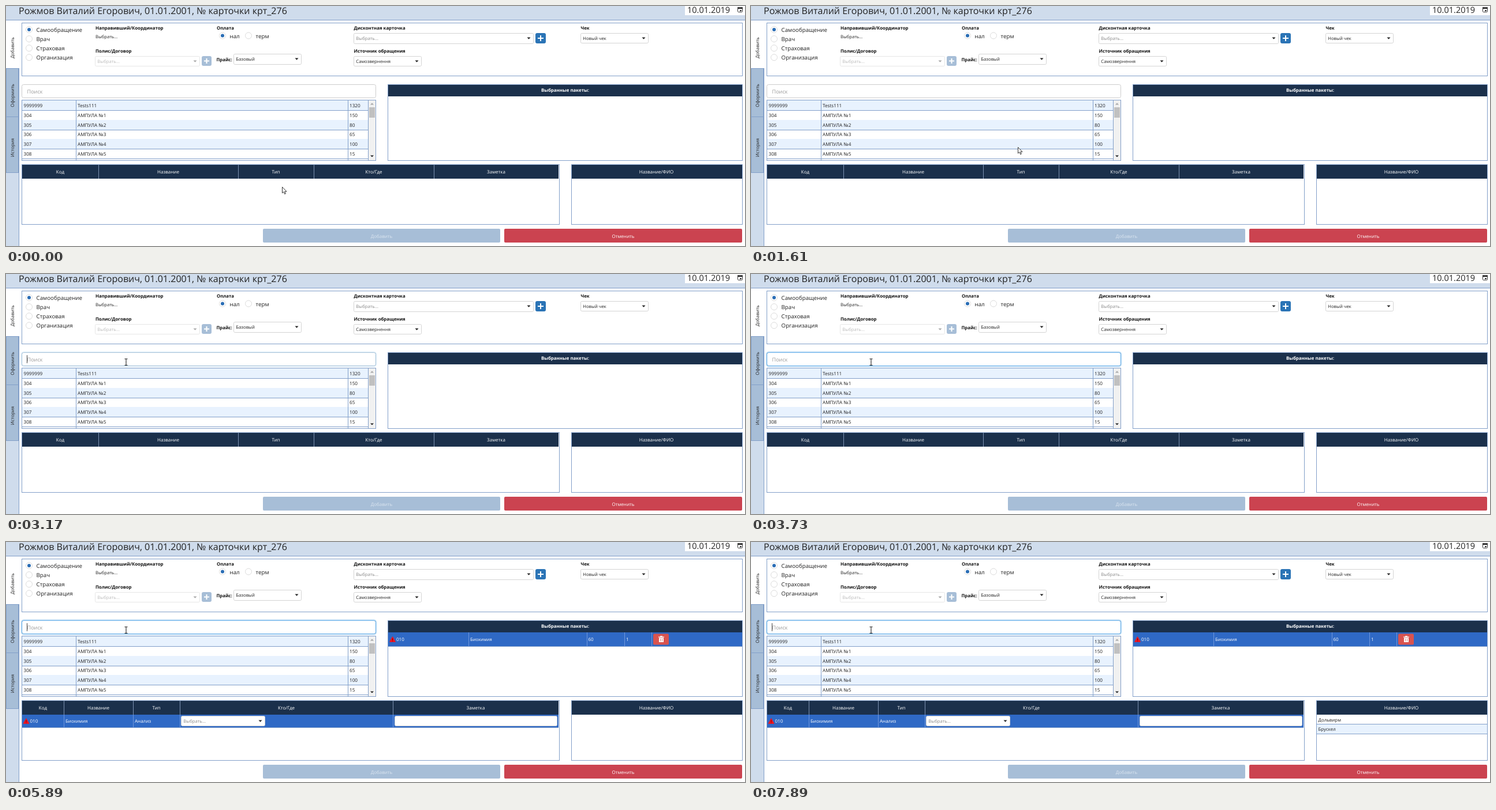
Write an HTML page that moves like this. It is 1280 px wide and 417 px high and loops after 8000 ms.

```html
<!DOCTYPE html>
<html lang="ru">
<head>
<meta charset="utf-8">
<style>
  html, body { margin: 0; width: 100%; height: 100%; overflow: hidden; }
  svg { display: block; width: 1280px; height: 417px; background: #fff; }
  text { font-family: "Open Sans", "Noto Sans", sans-serif; text-rendering: geometricPrecision; white-space: pre; }
</style>
</head>
<body>
<svg id="stage" viewBox="0 0 1280 417"></svg>
<script>
const LOOP = 8000;
const LINE = '#829fc9', NAVY = '#1b304b', PALE = '#e8f2fe', ROW = '#2f69c5', MUTED = '#a7bed7', INK = '#222';

// Shapes; box() edges are whole pixels, strokes sit inside.
const box = (x, y, x2, y2, fill, stroke, rx = 0) => {
  const o = stroke ? .5 : 0;
  return `<rect x="${x + o}" y="${y + o}" width="${x2 - x - 2 * o}" height="${y2 - y - 2 * o}" rx="${rx}" fill="${fill}" stroke="${stroke || 'none'}"/>`;
};
const path = (d, fill, stroke = 'none', width = 1) =>
  `<path d="${d}" fill="${fill}" stroke="${stroke}" stroke-width="${width}"/>`;
const vline = (x, y, y2, color = LINE) => box(x, y, x + 1, y2, color);
const hline = (x, x2, y, color = LINE) => box(x, y, x2, y + 1, color);
const text = (x, y, s, size = 7.9, fill = INK, extra = '') =>
  `<text x="${x}" y="${y}" font-size="${size}" fill="${fill}" ${extra}>${s}</text>`;
const mid = (x, y, s, fill = '#fff', extra = '') =>
  text(x, y, s, 8, fill, `text-anchor="middle" ${extra}`);
const bold = (x, y, s) => text(x, y, s, 7.8, '#111', 'font-weight="700"');

const caretDown = (x, y, color = INK) => path(`M${x - 3} ${y - 1.5}h6l-3 3.2z`, color);
const select = (x, y, x2, y2, s, ink = INK, border = '#d4d4d4') =>
  box(x, y, x2, y2, '#fff', border, 2) + text(x + 4.3, y + 11.6, s, 7.7, ink) +
  caretDown(x2 - 8.5, y + 9, ink === '#bbb' ? '#aaa' : INK);
const plus = (x, y, size, color) =>
  box(x, y, x + size, y + size, color, null, 3) +
  path(`M${x + size / 2} ${y + 4}v${size - 8}M${x + 4} ${y + size / 2}h${size - 8}`, 'none', '#fff', 2);
const radio = (x, y, label, on) =>
  `<circle cx="${x}" cy="${y}" r="5.5" fill="#fff" stroke="#dcdcdc"/>` +
  (on ? `<circle cx="${x}" cy="${y}" r="3" fill="#2a6db5"/>` : '') +
  text(x + 12.6, y + 4, label, 9.7);
const warning = (x, y) =>
  path(`M${x} ${y - 4.5}l5 9h-10z`, '#f01420', '#f01420', .8) +
  path(`M${x} ${y - 1.5}v3.2m0 1v1`, 'none', '#600', 1);
const sideTab = (y, y2, label, active) =>
  box(0, y, active ? 23 : 22, y2, active ? '#fff' : MUTED, active ? null : LINE) +
  text(0, 0, label, 7.9, INK, `text-anchor="middle" transform="translate(14 ${(y + y2) / 2 + (active ? 6 : 5)}) rotate(-90)"`);

function page() {
  const list = [['9999999', 'Tests111', 1320], ['304', 'АМПУЛА №1', 150], ['305', 'АМПУЛА №2', 80],
    ['306', 'АМПУЛА №3', 65], ['307', 'АМПУЛА №4', 100], ['308', 'АМПУЛА №5', 15]];
  const rows = list.map(([code, name, price], i) => {
    const y = Math.round(164 + i * 16.8), base = y + 11.5;
    return (i % 2 ? '' : box(28, y, 628, y + 17, PALE)) + hline(28, 628, y + 17) +
      text(30.5, base, code, 8.2) + text(124, base, name, 8.2) + text(595, base, price, 8.2);
  }).join('');

  return box(0, 0, 1280, 24, '#cfdcec') + box(0, 24, 22, 417, '#cfdcec') +
    hline(0, 1280, 24) + vline(22, 108, 417) +
    text(22, 13.5, 'Рожмов Виталий Егорович, 01.01.2001, № карточки крт_276', 16.05) +
    box(1176, 0, 1280, 16, '#fff') + text(1180, 12, '10.01.2019', 14.5) +
    box(1267, 2, 1276, 11, '#fff', '#333', 1) + box(1267, 2, 1276, 5, '#333') + box(1271, 7, 1274, 9, '#333') +
    sideTab(25, 108, 'Добавить', true) + sideTab(108, 193, 'Оформить') + sideTab(192, 290, 'История') +

    box(27, 29, 1276, 122, '#fff', LINE) +
    ['Самообращение', 'Врач', 'Страховая', 'Организация'].map((s, i) => radio(40, 41 + i * 16.1, s, !i)).join('') +
    bold(155, 40.5, 'Направивший/Координатор') + text(155, 56, 'Выбрать...', 7.6) +
    bold(155, 80.5, 'Полис/Договор') +
    select(154, 87, 336, 105, 'Выбрать...', '#bbb', '#e6e6e6') + plus(339, 87, 17, MUTED) +
    bold(365, 40.5, 'Оплата') + radio(375, 51.5, 'нал', true) + radio(420, 51.5, 'терм') +
    select(394, 83, 512, 102, 'Базовый') + bold(364.5, 95.5, 'Прайс:') +
    bold(602.5, 40.5, 'Дисконтная карточка') + select(602, 47, 914, 66, 'Выбрать...', '#888') + plus(917, 47, 18, '#2b74b6') +
    bold(602.5, 80.5, 'Источник обращения') + select(602, 87, 720, 105, 'Самозвернення') +
    bold(995.5, 40.5, 'Чек') + select(995, 47, 1113, 65, 'Новый чек') +

    box(27, 163, 641, 269, '#fff', LINE) + rows +
    [121, 592, 627].map(x => vline(x, 164, 268)).join('') +
    box(628, 164, 640, 268, '#f1f1f1') + box(629, 176, 639, 194, '#c1c1c1') +
    path('M631 171.5h6l-3-3z', '#a3a3a3') + path('M631 259.5h6l-3 3z', '#222') + hline(27, 641, 268) +

    box(661, 136, 1276, 269, '#fff', LINE) + box(662, 137, 1275, 157, NAVY) +
    text(968.5, 148.5, 'Выбранные пакеты:', 7.9, '#fff', 'text-anchor="middle" font-weight="700"') +
    box(27, 275, 959, 380, '#fff', LINE) + box(28, 276, 957, 300, NAVY) +
    box(979, 275, 1276, 380, '#fff', LINE) + box(980, 276, 1275, 300, NAVY) + mid(1126.5, 291, 'Название/ФИО') +
    box(445, 387, 856, 411, MUTED, null, 2) + mid(650.5, 402.5, 'Добавить', '#dbe5f0') +
    box(863, 387, 1275, 411, '#cb4350', null, 2) + mid(1069, 402.5, 'Отменить');
}

function tableHeader(edges) {
  return ['Код', 'Название', 'Тип', 'Кто/Где', 'Заметка'].map((s, i) =>
    mid((edges[i] + edges[i + 1]) / 2, 291, s) + (i ? vline(edges[i], 276, 300, '#7d92b2') : '')).join('');
}

// Selected row: fill, bottom rule and column rules.
const selectedRow = (x, x2, y, y2, columns) =>
  box(x, y, x2, y2, ROW) + hline(x, x2, y2 - 1) + columns.map(c => vline(c, y, y2, '#6f97dc')).join('');

function chosenPackage() {
  const edges = [28, 100, 220, 301, 670, 957];
  return selectedRow(662, 1275, 157, 182, [801, 1006, 1071, 1118]) +
    warning(669.5, 169) + text(676, 172, '010', 8, '#fff') + text(804, 172, 'Биохимия', 7.7, '#fff') +
    text(1008.5, 172, '60', 8, '#fff') + text(1074, 172, '1', 8, '#fff') +
    box(1121, 159.5, 1148, 178.5, '#d9534f', null, 2) +
    path('M1131 166.5h8v7.5h-8zM1130 164.5h10v1.2h-10zM1133 163.3h4v1.2h-4z', '#fff') +
    path('M1133.5 168v4.5m3-4.5v4.5', 'none', '#d9534f', .8) +
    tableHeader(edges) + selectedRow(28, 957, 300, 323, edges.slice(1, 5)) +
    warning(35, 311) + text(41.5, 314, '010', 8, '#fff') + text(103, 314, 'Биохимия', 7.8, '#fff') +
    text(223, 314, 'Анализ', 8, '#fff') +
    select(303, 302, 449, 320, 'Выбрать...', '#888') + box(673, 302, 955, 320, '#fff', '#d4d4d4', 2);
}

const performers = () =>
  text(982.5, 311.5, 'Дольвирм') + hline(980, 1275, 316) +
  box(980, 317, 1275, 333, PALE) + text(982.5, 328, 'Брускел') + hline(980, 1275, 333);

function search(query, focus, caret) {
  const x = 36 + query.length * 5.2 + (query ? .6 : 0);
  return box(27, 136, 641, 160, '#fff', '#ccc', 3) +
    `<g opacity="${focus}">` +
    '<rect x="27" y="135.5" width="614" height="25" rx="4" fill="none" stroke="#66afe9" stroke-opacity=".35" stroke-width="2.5"/>' +
    box(27, 136, 641, 160, 'none', '#66afe9', 3) + '</g>' +
    (query ? text(36.5, 151.5, query, 9, '#555') : text(36.5, 151.5, 'Поиск', 9.1, '#999')) +
    (caret ? vline(x, 141, 155, '#444') : '');
}

function pointer([x, y, beam]) {
  return beam
    ? path(`M${x - 2.5} ${y - 5.5}h2l.5 .5l.5-.5h2M${x} ${y - 5}v10M${x - 2.5} ${y + 5.5}h2l.5-.5l.5 .5h2`, 'none', '#222', 1.1)
    : path(`M${x + .5} ${y + .5}v10.5l2.4-2.2l1.8 4l1.7-.8l-1.7-3.7h3.3z`, '#fff', '#222', .9);
}

// Value of the latest [time, value] entry that has begun.
const at = (t, steps) => steps.filter(([start]) => start <= t).pop()[1];

const pointerSteps = [[0, [478, 314]], [140, [420, 306]], [260, [402, 302]], [700, [401, 304]], [840, [402, 305]],
  [1490, [95, 275]], [1610, [462, 245]], [1740, [132, 217]], [1890, [592, 185]], [2010, [208, 153, true]]];
const focusSteps = [[0, 0], [3170, .4], [3300, .8], [3460, 1]];
const querySteps = [[0, ''], [5090, '0'], [5210, '01'], [5360, '010'], [5890, '']];
const caretSteps = [[0, 0], [3170, 1], [3730, 0], [4260, 1], [4790, 0], [5090, 1], [6320, 0], [6880, 1], [7460, 0], [7890, 1]];

const background = page(), emptyTable = tableHeader([28, 160, 402, 533, 741, 957]), filledTable = chosenPackage();
const stage = document.getElementById('stage');
let shown = '';

function draw() {
  const t = performance.now() % LOOP;
  const scene = background + (t < 5890 ? emptyTable : filledTable) + (t < 6320 ? '' : performers()) +
    search(at(t, querySteps), at(t, focusSteps), at(t, caretSteps)) + pointer(at(t, pointerSteps));
  if (scene !== shown) stage.innerHTML = shown = scene;
  requestAnimationFrame(draw);
}
draw();
</script>
</body>
</html>
```
